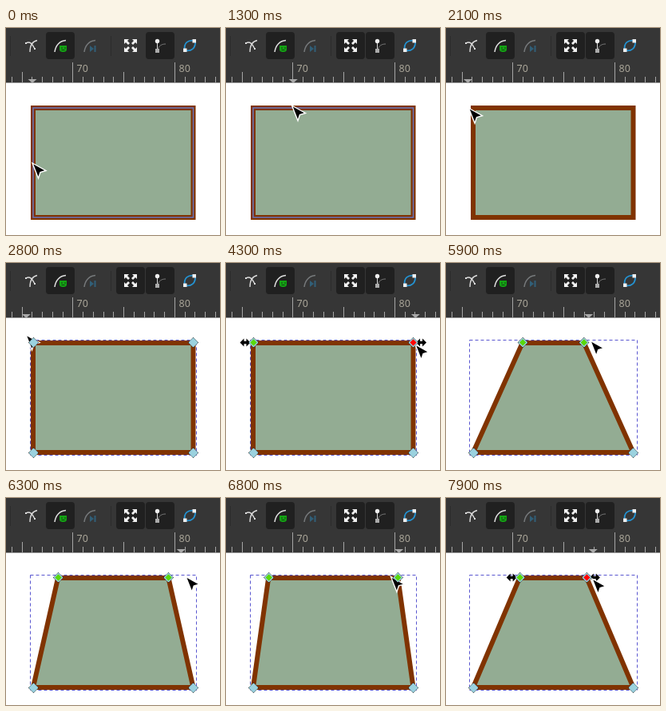
These frames come from a looping animation (268x259 px, 8 s). An HTML page:

```html
<!DOCTYPE html>
<html lang="en">
<head>
<meta charset="utf-8">
<title>Scaling nodes</title>
<style>
  html, body { margin: 0; width: 100%; height: 100%; overflow: hidden; background: #fff; }
  svg { display: block; width: 268px; height: 259px; }
  text { font: 12.5px "Noto Sans", "Open Sans", sans-serif; fill: #aaa699; }
</style>
</head>
<body>
<svg viewBox="0 0 268 259">
  <defs>
    <path id="arrow" d="M-6.5 0L-1.5-5V-1.8H1.5V-5L6.5 0L1.5 5V1.8H-1.5V5Z"/>
    <path id="corner" d="M-8-8H-2L-4-6L-1-3L-3-1L-6-4L-8-2Z"/>
    <path id="arc" d="M-7 8C-6 0-1-6 7-6.5" fill="none" stroke-width="1.5"/>
    <g id="node">
      <path d="M0-6.5L6.5 0L0 6.5L-6.5 0Z"/>
      <path d="M0-5.2L5.2 0L0 5.2L-5.2 0Z" fill="currentColor" stroke="#9bd2df" stroke-width="1.4" stroke-linejoin="bevel"/>
    </g>
  </defs>

  <rect width="268" height="68.5" fill="#363636"/>
  <g fill="#202020">
    <rect x="50" y="5" width="36" height="34" rx="4"/>
    <rect x="175" y="5" width="36" height="34" rx="4"/>
    <rect id="toggle" x="138" y="5" width="36" height="34" rx="4"/>
  </g>
  <path d="M5.5 10V35M131.5 10V35" stroke="#2c2c2c"/>

  <g transform="translate(31 22)" stroke="#dedede" fill="none">
    <path d="M8-6.5C1-5-1 0-1 8M-6-3C-1-6 2-2 5 4" stroke-width="1.3"/>
    <path d="M-7-4H-5V-2H-7ZM4 3H6V5H4Z" fill="#dedede" stroke="none"/>
  </g>
  <g transform="translate(68 22)">
    <use href="#arc" stroke="#dedede"/>
    <path d="M-1 0H8V5Q8 8 3.5 8T-1 5Z" fill="#13a513"/>
    <path d="M1 3H3M5 3H7M1.5 5.5H5.5" stroke="#163c16"/>
  </g>
  <g transform="translate(105 22)">
    <use href="#arc" stroke="#76797b"/>
    <path d="M0 0L5 4L0 8ZM5.5 0H7.5V8H5.5Z" fill="#315f78"/>
  </g>
  <g transform="translate(156 22)" fill="#f2f2f2">
    <use href="#corner"/>
    <use href="#corner" transform="rotate(90)"/>
    <use href="#corner" transform="rotate(180)"/>
    <use href="#corner" transform="rotate(270)"/>
  </g>
  <g fill="none">
    <path d="M190 30C190 24 193 20 200 20" stroke="#777"/>
    <path d="M189.5 16V28" stroke="#d8d8d8"/>
    <circle cx="189.5" cy="16.5" r="2.7" fill="#eee"/>
    <rect x="187" y="26" width="5" height="5" fill="#aaa"/>
  </g>
  <path d="M224 28C222 19 228 14 237 16C238 25 232 30 224 28" fill="none" stroke="#2492d1" stroke-width="1.8"/>
  <path d="M222 25.5H226.5V30H222ZM233.5 14H238V18.5H233.5Z" fill="#eee"/>

  <path id="ticks" stroke="#a5a5a5" fill="none"/>
  <text x="88.5" y="55">70</text>
  <text x="216.5" y="55">80</text>
  <path id="marker" d="M-5.5 64H5.5L0 69Z" fill="#a9a9a9"/>

  <path id="shape" fill="#93ac93" stroke="#803300" stroke-width="6"/>
  <path id="hover" fill="none" stroke="#6874bd" stroke-width="1.5"/>
  <rect id="bounds" y="96.5" height="144" fill="none" stroke="#5a57d0" stroke-dasharray="4 3"/>
  <g id="arrows">
    <use id="arrowLeft" href="#arrow"/>
    <use id="arrowRight" href="#arrow"/>
  </g>
  <path id="cursor" d="M0 0L17 9.5L10 11.5L7.5 19Z" stroke="#fff" stroke-width="1.4"/>
  <g id="nodes" color="#9bd2df">
    <use id="nodeLeft" href="#node"/>
    <use id="nodeRight" href="#node"/>
    <use href="#node" x="34.5" y="237.5"/>
    <use href="#node" x="234.5" y="237.5"/>
  </g>
</svg>

<script>
const LOOP = 8000, STEP = 100;
const LEFT = 34, RIGHT = 234.5, TOP = 100, BOTTOM = 237;
const CENTER = (LEFT + RIGHT) / 2;
const GRAB = { time: 5200, x: 248 }, RELEASE = 7000;
const MARKER_LAG = 50, SHAPE_LAG = 100;

const $ = id => document.getElementById(id);
const smooth = u => (1 - Math.cos(Math.PI * u)) / 2;
const easeOut = u => 1 - (1 - u) ** 2;
const clamp = (v, lo, hi) => Math.min(hi, Math.max(lo, v));
const within = (t, from, to) => t >= from && t < to;

// The pointer rests between its trips.
const home = { x: 33, y: 169 };
const trip = (start, end, x, y, ease = smooth) => ({ start, end, x, y, ease });
const trips = [
  trip(100, 700, 153, 16),                  // to the toolbar button
  trip(800, 1300, 82.5, 97),                // back to the outline
  trip(1300, 1900, 27, 100),
  trip(2000, 2300, 33, 101),                // click the outline
  trip(2400, 2800, 25, 90),
  trip(2800, 3600, 251, 118),               // select the top nodes
  trip(3800, 4300, 237, 102),
  trip(4400, 4900, GRAB.x, 97),             // reach the scale arrow
  trip(GRAB.time, 5700, 178, 97, easeOut),  // drag in, out and in again
  trip(5800, 6550, 241, 99),
  trip(6550, RELEASE, 182, 98),
  trip(7300, 7550, 208, 115),
  trip(7550, 7900, 183, 101)
];

function pointerAt(t) {
  let { x, y } = home;
  for (const leg of trips) {
    const k = leg.ease(clamp((t - leg.start) / (leg.end - leg.start), 0, 1));
    x += (leg.x - x) * k;
    y += (leg.y - y) * k;
  }
  return { x, y };
}

// The top edge scales about its centre, a little behind the pointer.
function insetAt(t) {
  const grip = pointerAt(clamp(t - SHAPE_LAG, GRAB.time, RELEASE)).x;
  const scale = (grip - CENTER) / (GRAB.x - CENTER);
  return (1 - scale) * (RIGHT - LEFT) / 2;
}

const show = (id, on) => $(id).setAttribute("visibility", on ? "visible" : "hidden");
const move = (id, x, y = 0) => $(id).setAttribute("transform", `translate(${x} ${y})`);

function drawRuler() {
  let path = "";
  for (let i = -6; i <= 14; i++) {
    const height = i % 10 === 0 ? 25 : i % 5 === 0 ? 13 : 7;
    path += `M${Math.floor(83.99 + i * 12.75) + 0.5} 68v${-height}`;
  }
  $("ticks").setAttribute("d", path);
}

function draw(t) {
  const pointer = pointerAt(t);
  move("cursor", pointer.x, pointer.y);
  move("marker", pointerAt(t - MARKER_LAG).x);

  const inset = insetAt(t);
  const left = LEFT + inset, right = RIGHT - inset;
  const outline = `M${left} ${TOP}H${right}L${RIGHT} ${BOTTOM}H${LEFT}Z`;
  $("shape").setAttribute("d", outline);
  $("hover").setAttribute("d", outline);

  // The mitred lower corners widen the bounding box as the sides lean in.
  const angle = Math.atan2(BOTTOM - TOP, inset);
  const boxLeft = Math.floor(LEFT - 0.2 - 3 / Math.tan(angle / 2)) + 0.5;
  $("bounds").setAttribute("x", boxLeft);
  $("bounds").setAttribute("width", 2 * (CENTER - boxLeft) + 0.5);

  const pathSelected = t >= 2500, nodesSelected = t >= 3600;
  show("toggle", t >= 900);
  show("hover", t < 300 || within(t, 1300, 1900) || within(t, 2200, 2500));
  show("nodes", pathSelected);
  show("bounds", pathSelected);
  show("arrows", nodesSelected && !within(t, GRAB.time + STEP, RELEASE + 2 * STEP));

  move("arrowLeft", left - 10, 99.5);
  move("arrowRight", right + 10, 99.5);
  move("nodeLeft", left + 0.5, 99.5);
  move("nodeRight", right, 99.5);

  const color = nodesSelected ? "#59d80a" : "#9bd2df";
  const hot = within(t, 4200, 4500) || t >= 7800;
  $("nodeLeft").setAttribute("color", color);
  $("nodeRight").setAttribute("color", hot ? "#ff0000" : color);
}

drawRuler();
const start = performance.now();
function tick() {
  const t = (performance.now() - start) % LOOP;
  draw(Math.floor(t / STEP) * STEP);
  requestAnimationFrame(tick);
}
tick();
</script>
</body>
</html>
```
